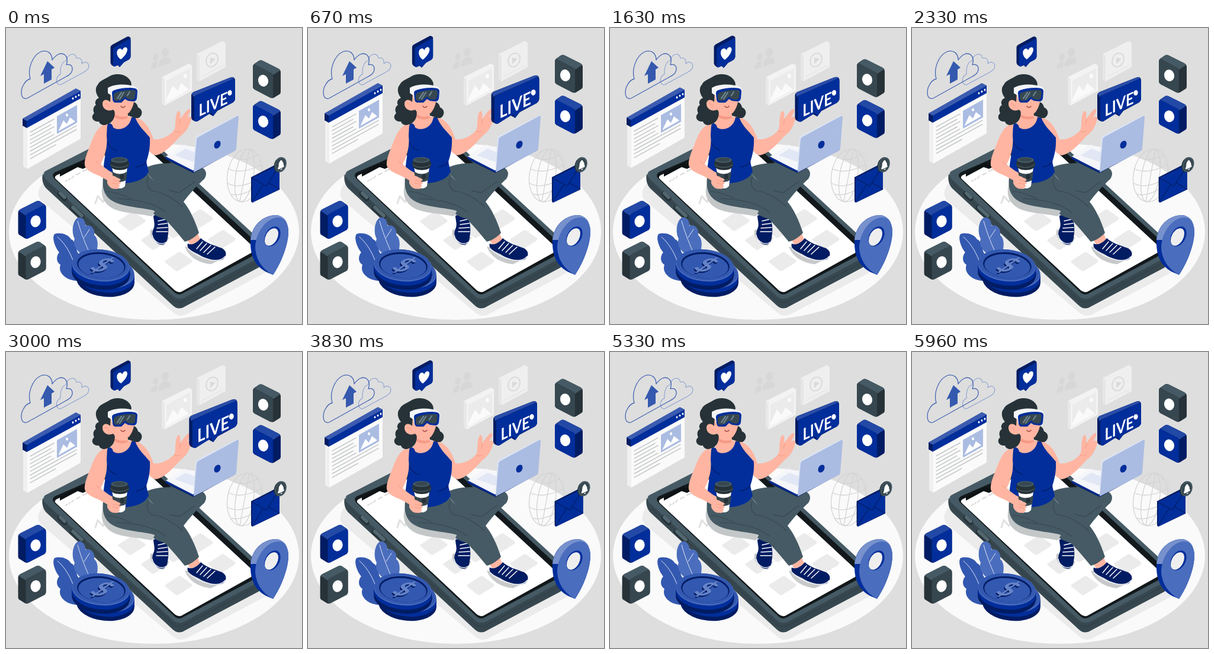
Write an HTML page with a canvas that moves like this. It is 500 by 500 pixels and loops after 6 s.

```html
<!DOCTYPE html>
<html lang="en">
<head>
<meta charset="utf-8">
<title>Social media scene</title>
<style>
html, body { margin: 0; width: 100%; height: 100%; overflow: hidden; background: #dedede; }
canvas { display: block; width: 500px; height: 500px; }
</style>
</head>
<body>
<canvas id="stage"></canvas>
<script>
const BLUE = '#022e9b', NAVY = '#011c63', MID = '#3358b0', SOFT = '#4a6dbd', PALE = '#abbce2';
const SLATE = '#455a64', STEEL = '#37474f', INK = '#263238', SKIN = '#ffb5a1', SKIN2 = '#f59a86';
const dpr = window.devicePixelRatio || 1;
const LOOP = 6000;

function surface(c) {
  c.width = c.height = 500 * dpr;
  const ctx = c.getContext('2d');
  ctx.scale(dpr, dpr);
  ctx.lineCap = ctx.lineJoin = 'round';
  return ctx;
}
const screen = surface(document.getElementById('stage'));
const backdrop = document.createElement('canvas');
let g = surface(backdrop);

function fill(color, d) {
  g.fillStyle = color;
  g.fill(new Path2D(d));
}
function line(color, width, d) {
  g.strokeStyle = color;
  g.lineWidth = width;
  g.stroke(new Path2D(d));
}
function oval(color, x, y, rx, ry = rx, turn = 0, width = 0) {
  g.beginPath();
  g.ellipse(x, y, rx, ry, turn, 0, Math.PI * 2);
  if (width) {
    g.strokeStyle = color;
    g.lineWidth = width;
    g.stroke();
  } else {
    g.fillStyle = color;
    g.fill();
  }
}
function group(draw, dx = 0, dy = 0, scale = 1, cx = 0, cy = 0) {
  g.save();
  g.translate(cx + dx, cy + dy);
  g.scale(scale, scale);
  g.translate(-cx, -cy);
  draw();
  g.restore();
}

// Cube badge with a plain dot on its front face
function badge(x, y, flip, front, side, top) {
  g.save();
  g.translate(x, y);
  g.scale(flip, 1);
  fill(side, 'M0 11Q0 7 4 5L10 1Q13-1 17 1L43 14Q47 16 47 20V53Q47 57 44 58L36 63Q33 65 29 63L4 50Q0 48 0 44Z');
  fill(top, 'M1 8L10 1Q13-1 17 1L43 14Q46 16 46 17L34 25Q33 22 30 21L5 8Q3 7 1 8Z');
  fill(front, 'M0 11Q0 6 5 8L30 21Q34 23 34 28V60Q34 65 29 63L4 50Q0 48 0 44Z');
  oval('#fff', 17.5, 34.5, 8.5, 10, -.25);
  g.restore();
}

function clouds() {
  line('#8ba0d2', 1.1, 'M90 96C83 93 84 82 92 78C91 65 96 56 101 56C104 43 117 40 119 51C126 49 129 54 128 60C136 54 142 61 139 68C137 72 133 74 129 76L92 96Z');
  line('#4767b3', 1.3, 'M32 119C24 118 25 104 29 97C32 91 36 87 41 86C36 70 44 47 59 40C70 36 78 43 78 54C85 44 93 41 99 45C104 49 104 56 102 62C112 60 115 69 109 77C107 79 104 81 100 83L37 118Q34 120 32 119Z');
  fill('#3559ae', 'M70 56L82 67L77 70V87L64 94V78L58 81Z');
}

function faintIcons() {
  oval('#d7d7d7', 269, 41, 6, 7.5, .3);
  fill('#d7d7d7', 'M258 66C257 55 263 50 270 49C276 49 279 53 278 59Z');
  oval('#d7d7d7', 253, 49, 4.5, 6, .3);
  fill('#d7d7d7', 'M245 70C244 60 250 56 257 56C255 60 255 63 255 66Z');

  fill('#f3f3f3', 'M263 83L309 60L314 63V106L268 131L263 128Z');
  fill('#e8e8e8', 'M263 83L268 86V131L263 128Z');
  fill('#ebebeb', 'M271 89L311 68V104L271 125Z');
  fill('#fafafa', 'M271 120L282 97L290 106L296 93L309 104L271 125Z');
  oval('#fafafa', 303, 81, 3, 3.8);

  fill('#efefef', 'M322 44L366 22L371 25V66L327 90L322 87Z');
  fill('#e6e6e6', 'M322 44L327 47V90L322 87Z');
  line('#e2e2e2', 1, 'M331 82L367 63');
  oval('#dadada', 348, 54, 9.5, 12, .45, 2);
  fill('#dadada', 'M345 50L354 52L345 61Z');
}

function globe() {
  const c = '#d3d3d3';
  for (const rx of [29, 15]) oval(c, 403, 249, rx, 45, .16, 1.3);
  line(c, 1.3, 'M411 205L395 293M376 238C392 246 414 240 431 231M374 262C391 272 414 264 431 251M381 281C394 284 410 278 423 268M385 219C396 225 412 222 425 214');
  line('#dadada', 1, 'M398 207C414 199 433 207 434 230C435 250 427 268 415 281');
}

function phone() {
  fill('#ebebeb', 'M62 262Q48 280 60 292L283 481Q294 490 306 483L446 409L430 390Z');
  fill(STEEL, 'M62 247C60 254 62 265 68 271L281 468Q291 478 303 470L426 405Q437 398 437 386L434 370L300 440Z');
  fill(SLATE, 'M66 242Q59 249 70 258L282 453Q291 461 302 455L426 389Q438 381 429 369L430 359L247 190Q220 168 195 176Z');
  fill('#12181b', 'M82 244Q76 249 82 255L284 446Q291 453 299 448L415 386Q424 379 423 362L242 194Q218 178 204 190L130 223Z');
  fill('#fff', 'M85 249L118 233L127 236L173 212L226 192L416 368Q421 374 414 380L299 444Q292 449 285 443L84 255Q81 252 85 249Z');
  fill('#0d1215', 'M91 245L123 228L131 231L163 216V221L130 238L121 235L91 251Z');
  line('#2f3d44', 1, 'M69 263L282 460Q291 467 302 461L429 394');
  line(INK, 9, 'M91 280L99 288M112 304L128 318');
  line('#52676f', 6, 'M92 279L99 286M113 303L128 317');
  // Status bar and app tiles
  line('#dadada', 2, 'M101 259L103 257M106 257L108 254M111 254L114 250M119 248L125 245M130 242L138 238');
  line('#e1e1e1', 3, 'M151 296L155 284L164 294L169 281');
  for (const [x, y] of [[213, 326], [252, 358], [292, 394], [327, 322], [286, 338], [365, 357]])
    fill('#ebebeb', `M${x - 23} ${y + 2}Q${x - 25} ${y} ${x - 21} ${y - 2}L${x - 1} ${y - 15}Q${x + 2} ${y - 17} ${x + 5} ${y - 14}L${x + 22} ${y - 2}Q${x + 24} ${y} ${x + 20} ${y + 3}L${x - 1} ${y + 16}Q${x - 4} ${y + 18} ${x - 7} ${y + 15}Z`);
}

function plants() {
  fill(MID, 'M119 427C101 426 87 413 92 400C83 394 86 383 90 379C83 371 77 354 82 348C90 345 104 347 110 357C116 359 119 369 120 377C128 390 130 415 119 427Z');
  line('#dfe6f5', 1, 'M87 353C102 366 114 387 121 419');
  fill(SOFT, 'M140 388C119 381 112 365 116 356C110 346 112 325 122 320C130 318 135 328 134 334C143 331 151 339 149 350C158 357 155 375 150 388Z');
  line('#dfe6f5', 1, 'M121 326C127 348 136 369 143 384M132 354L141 340');
}

function coin(x, y) {
  const tilt = .1;
  oval(NAVY, x, y + 15, 49, 27, tilt);
  fill(NAVY, `M${x - 49} ${y - 5}V${y + 11}L${x + 49} ${y + 19}V${y + 5}Z`);
  oval(BLUE, x, y + 8, 49, 27, tilt);
  oval(SOFT, x, y + 1, 49, 27, tilt);
  oval(MID, x, y, 48, 26, tilt);
  oval(NAVY, x + 1, y + .5, 41, 21.5, tilt);
  oval(MID, x + 1, y + 2, 39, 20, tilt);
}
function coins() {
  coin(168, 412);
  coin(160, 400);
  g.save();
  g.transform(.9, .25, -.75, .62, 161, 402);
  g.font = '700 46px Lato, Inter, sans-serif';
  g.textAlign = 'center';
  g.textBaseline = 'middle';
  g.fillStyle = NAVY;
  g.fillText('$', 1, 3);
  g.fillStyle = '#6684c8';
  g.fillText('$', 0, 0);
  g.restore();
}

function pin() {
  fill(BLUE, 'M413 366C411 339 430 317 455 316C468 316 477 328 477 344C477 366 465 397 451 417L444 414C425 406 414 391 413 366Z');
  fill('#7791cd', 'M413 358C416 332 436 316 455 316C464 316 471 321 474 328L459 321C440 326 427 342 423 358Z');
  fill(SOFT, 'M421 371C421 346 440 320 460 320C472 320 477 331 477 345C476 368 463 400 451 417C436 409 422 394 421 371Z');
  oval(BLUE, 450, 352, 12, 18, .5);
  oval('#eeeeee', 448.5, 353, 9.8, 16, .5);
}

function legs() {
  fill('#c4c7c8', 'M164 262C158 282 164 298 185 307C205 314 225 313 245 318L270 304L220 270Z');
  fill('#c7c9ca', 'M245 340C240 350 250 363 266 368L276 354ZM302 369C308 386 325 397 346 399L370 388Z');
  fill('#fff', 'M249 318L253 312L272 317L270 325Z');
  fill(NAVY, 'M249 317C255 314 267 318 271 322C275 332 275 344 273 354C272 366 262 369 255 363C245 356 246 345 250 337C252 330 249 324 249 317Z');
  line('#fff', 1.4, 'M257 326L270 323M257 332L272 330M255 338L273 337M254 344L273 344');
  line('#eef1f7', 1.5, 'M247 350C249 361 261 368 270 362');
  fill(SLATE, 'M232 238C255 225 285 227 313 232C335 232 343 243 335 255C318 270 301 290 279 323C270 324 257 320 249 314L267 278Z');
  line(STEEL, 1.2, 'M243 272C259 266 278 277 293 278C302 273 309 265 319 260M280 280C275 290 268 300 262 305');
  fill(SKIN, 'M302 349L322 342L329 360L311 366Z');
  fill(SLATE, 'M165 245C160 275 168 288 188 296C211 304 238 304 251 309C267 318 287 343 302 361C311 359 321 352 326 346C320 327 310 304 297 290C277 270 254 268 240 247Z');
  line(STEEL, 1.1, 'M240 252C236 264 240 270 246 275C263 276 285 289 298 302M170 276C186 277 199 283 211 288M187 288C213 289 249 294 269 311');
  fill(NAVY, 'M307 364C312 367 321 365 329 355C337 363 351 367 365 372C375 378 372 387 366 391C353 396 337 390 325 382C315 377 304 373 307 364Z');
  line('#eef1f7', 1.7, 'M308 373C316 381 330 388 343 391C353 394 364 393 370 386');
  line('#fff', 1.5, 'M322 373L332 361M328 376L339 364M334 379L346 367M340 382L353 370');
}

function laptop() {
  fill(NAVY, 'M270 217L316 240L388 203V206L317 245L270 222Z');
  fill('#f5f6fa', 'M270 217L301 197L349 214L316 241Z');
  fill('#e1e7f4', 'M285 215L303 204L330 214L316 226Z');
  line(BLUE, 2.2, 'M270 219L316 242');
  fill('#dce4f4', 'M316 241L320 186Q320 184 323 182L391 147L393 148L323 186Z');
  fill(PALE, 'M317 244L322 188Q322 186 325 184L390 149Q393 147 393 151L389 203Q389 206 386 208Z');
  oval(BLUE, 357, 197, 5, 7, .5);
}

function body() {
  fill(SKIN, 'M211 149C232 151 243 168 249 188C262 190 276 182 284 173C288 167 284 151 290 141C293 138 296 144 294 154C299 148 304 139 309 137C314 137 310 144 306 151C312 148 315 151 312 157C309 168 303 177 294 183C280 199 266 213 253 215C242 213 236 200 229 184Z');
  line(SKIN2, 1, 'M284 174C287 176 291 176 294 174M295 154L293 163');
  fill(SKIN, 'M180 137L204 140L207 150C216 149 223 154 226 165L207 183L172 178L162 169C170 164 179 163 181 154Z');
  fill(SKIN2, 'M181 144C187 149 195 151 205 149L206 152C195 157 186 153 181 149Z');
  fill(BLUE, 'M172 162C176 160 180 162 181 168C191 175 209 169 212 151L218 150C222 164 234 174 243 185C244 204 240 217 237 226L241 243C236 255 216 263 196 262C182 261 166 253 164 247C165 222 170 207 170 194C166 184 169 172 172 162Z');
  line(NAVY, 1.2, 'M171 193C174 200 180 205 187 207M237 226C232 232 226 234 220 235');
  fill(SKIN, 'M171 162C155 164 149 181 143 196C137 211 132 222 133 232C135 240 146 245 158 250L174 259C176 266 181 271 188 272L199 266L193 249C179 246 169 238 160 230C168 215 172 198 170 182Z');
  line(SKIN2, 1, 'M158 230C156 229 154 227 153 225');
}

function cup() {
  fill('#fff', 'M179 235L205 235L201 267C197 272 190 272 186 268Z');
  fill(STEEL, 'M179 242C187 248 197 248 205 242L203 257C196 261 188 261 182 257Z');
  oval(INK, 196, 251, 3.6, 4.6);
  fill(INK, 'M176 229L178 221L205 221L208 229C209 237 201 240 192 240C184 240 175 237 176 229Z');
  oval(SLATE, 191.5, 223, 14, 5);
  oval(STEEL, 191.5, 222.5, 11, 3.3);
  line('#566970', 1, 'M177 231C183 237 200 237 207 231');
  fill(SKIN, 'M171 253C175 248 183 249 188 253C195 255 195 258 190 259C195 260 195 264 190 264C194 266 192 270 187 271C180 274 173 268 171 262Z');
  line(SKIN2, .9, 'M181 257L190 259M180 262L190 264');
}

function head() {
  fill(INK, 'M204 127C217 121 222 128 223 134C231 137 232 147 224 152C217 153 212 149 206 148ZM174 82C185 75 205 77 211 91C215 101 203 110 190 106L182 136C187 147 181 161 170 163C164 166 158 162 157 158C147 159 142 150 149 144C146 138 148 132 152 130C149 125 152 120 157 118C151 111 150 101 155 96C158 89 166 87 174 82Z');
  fill(SKIN, 'M177 106C187 99 207 98 216 106C219 118 216 133 208 143C199 149 187 146 181 138C172 142 163 137 163 128C163 121 170 119 176 125Z');
  line(SKIN2, 1, 'M167 128C170 127 173 130 174 133');
  line('#a94e4b', 1.5, 'M194 132C196 135 199 135 201 132');
  fill(INK, 'M164 92C182 80 204 84 212 97C200 95 184 96 176 101C178 110 174 116 176 121L164 118Z');
  fill('#f4f5f7', 'M172 101C184 94 206 94 218 99Q223 101 223 106L218 112L182 124Q178 120 178 114L172 110Z');
  fill(BLUE, 'M183 105C194 101 209 100 218 102Q222 103 222 107L221 119Q220 124 215 124L206 123L201 120L195 126L185 126Q181 126 180 121L179 110Q179 106 183 105Z');
  fill(STEEL, 'M185 109C195 105 208 104 217 105L219 107L218 117Q217 121 212 121L206 120L201 116L194 122L186 123Q183 123 182 119L182 112Z');
  line('#6d8591', 2.2, 'M188 119L195 109M205 114L209 108M192 120L199 109');
}

function heart() {
  fill(NAVY, 'M176.5 33Q176.5 30 180 28L204 15Q208 13 210.5 17V48Q210.5 51 208 53L199 58L192 66L189 63L183 65Q176.5 63 176.5 58Z');
  fill(BLUE, 'M181 37Q181 34 184 32L206 20Q210.5 17 210.5 21V48Q210.5 51 208 53L199 58L192 66L190 62L184 65Q181 66 181 62Z');
  fill('#fff', 'M194 53C185 47 186 36 192 35C195 34 196 37 196 38C199 31 205 31 205 37C204 43 200 48 194 53Z');
}

function page() {
  fill('#f0f0f0', 'M29 164L36 168V238L29 234Z');
  fill('#fafafa', 'M36 168L126 118V187L36 238Z');
  fill('#3c5cb0', 'M28 153L118 102L126 106L35 158Z');
  fill(NAVY, 'M28 153L35 157V169L28 165Z');
  fill(BLUE, 'M35 157L126 106V119L35 169Z');
  for (let i = 0; i < 3; i++) oval('#fff', 113 + i * 5, 119 - i * 2.8, 1.4, 1.9);
  fill(PALE, 'M86 149L120 130V160L86 179Z');
  fill('#fff', 'M89 173L97 156L103 162L108 151L117 158L89 174Z');
  oval('#fff', 103, 147, 2, 2.6);
  for (let i = 0; i < 8; i++) {
    const y = 176 + i * 6.4, end = i < 5 ? 81 - i % 2 * 5 : i < 7 ? 119 : 84;
    line('#c3c5c7', 1.5, `M41 ${y}L${end} ${y - (end - 41) * .55}`);
  }
}

function live() {
  fill(NAVY, 'M313 114Q313 110 317 108L378 84Q386 81 387 88V119Q387 123 383 126L357 140L350 149L343 145L323 158Q313 157 313 151Z');
  fill('#2a4da8', 'M314 111L317 108L378 84Q384 82 386 85L320 114Q318 115 317 117Z');
  fill(BLUE, 'M318 120Q318 115 323 113L382 87Q387 85 387 90V119Q387 123 383 126L357 139L350 149L347 143L324 157Q318 160 318 154Z');
  g.save();
  g.transform(.84, -.39, 0, 1, 325.5, 150);
  g.font = '700 28px Lato, Inter, sans-serif';
  g.fillStyle = '#fff';
  g.fillText('LIVE', 0, 0);
  g.restore();
  oval('#fff', 378, 109.5, 3.6, 4.6, .2);
}

function mail() {
  fill(NAVY, 'M414 252L459 229L462 231V273L416 295L414 293Z');
  fill(BLUE, 'M416 253L462 231V272L416 295Z');
  line(NAVY, 1.2, 'M416 254L440 267L462 232M416 293L434 265M462 272L444 262');
  oval(INK, 462, 231, 9, 13, .35);
  oval(SLATE, 464, 231, 9.5, 13, .35);
  oval(STEEL, 464, 231, 7.8, 11, .35);
  fill('#fff', 'M459 237C462 234 459 229 463 225C464 222 467 223 467 226C470 228 468 232 470 233L469 235L460 239ZM463 239L467 237Q466 241 463 239Z');
}

g.fillStyle = '#dedede';
g.fillRect(0, 0, 500, 500);
oval('#fafafa', 250, 344, 245, 149);
clouds();
faintIcons();
globe();
phone();
plants();
coins();
pin();
badge(67.5, 292, -1, BLUE, NAVY, '#2349a6');
badge(67.5, 361, -1, STEEL, INK, SLATE);
legs();
body();
laptop();
cup();
head();

// Double pulse, then rest
function beat(p) {
  const stops = [[0, 0], [.1, 1], [.3, 0], [.4, 0], [.5, 1], [.6, 0], [1, 0]];
  const i = stops.findIndex(s => s[0] > p);
  const [a, u] = stops[i - 1], [b, v] = stops[i];
  return 1 + .1 * (u + (v - u) * (p - a) / (b - a));
}

// cubic-bezier(.36, .07, .19, .97)
function snap(x) {
  const curve = (s, a, b) => 3 * s * (1 - s) * ((1 - s) * a + s * b) + s ** 3;
  let lo = 0, hi = 1;
  for (let i = 0; i < 20; i++) {
    const m = (lo + hi) / 2;
    if (curve(m, .36, .19) < x) lo = m; else hi = m;
  }
  return curve(lo, .07, .97);
}
function shake(p) {
  const xs = [0, -1, 2, -4, 4, -4, 4, -4, 2, -1, 0];
  const i = Math.floor(p * 10);
  return xs[i] + (xs[i + 1] - xs[i]) * snap(p * 10 - i);
}

const start = performance.now();
function frame() {
  const t = (performance.now() - start) % LOOP;
  const phase = ms => t % ms / ms;
  const lift = -10 * (1 - Math.abs(1 - 2 * phase(1500)));
  g = screen;
  g.drawImage(backdrop, 0, 0, 500, 500);
  group(page, 0, lift);
  badge(417, 54.5 + lift, 1, STEEL, INK, SLATE);
  badge(417, 123.5 + lift, 1, BLUE, NAVY, '#2349a6');
  group(heart, 0, 0, beat(phase(3000)), 193.5, 40);
  group(mail, shake(phase(1500)));
  group(live, 0, 0, beat(phase(6000)), 350, 116);
  requestAnimationFrame(frame);
}
frame();
</script>
</body>
</html>
```
